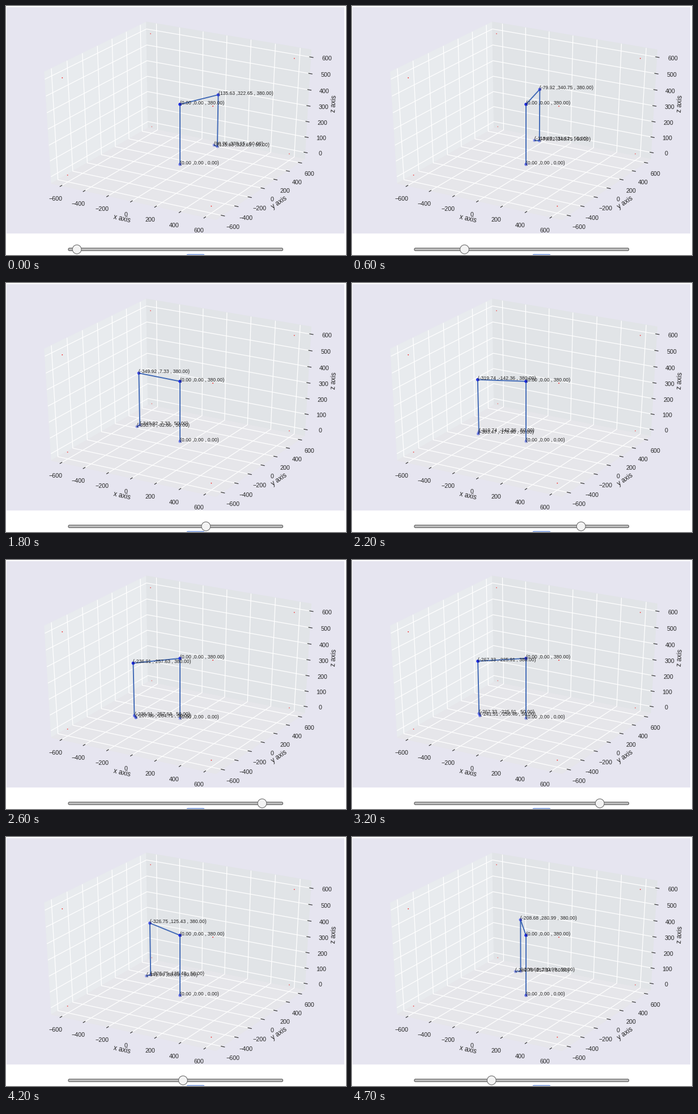
A matplotlib script for the animation above (4800 ms loop, 600 by 440 pixels).

```python
import numpy as np
import matplotlib.pyplot as plt
from matplotlib.animation import FuncAnimation
from matplotlib.patches import Circle, FancyBboxPatch, Polygon, Rectangle

plt.rcParams["font.family"] = "Liberation Sans"

W, H, DPI = 600, 440, 100
FRAMES, INTERVAL = 48, 100
PT = 72 / DPI           # points per pixel
INK = "#262626"
BLUE = "#3f68b5"

# Plot area on the page, in pixels
LEFT, TOP, PW, PH = 1, 2, 596, 400
CX = LEFT + PW * 0.95 / 1.85
CY = TOP + PH * 0.90 / 1.85
SX, SY = PW / 1.85, PH / 1.85

# Camera and data ranges
ELEV, AZIM, DIST = np.radians(30), np.radians(-60), 10
CENTER = np.array([0, 0, 300])
SPAN = np.array([1320, 1320, 660])
EDGE = 0.5 * 25 / 24    # half the box, in units of the span
LO, HI = CENTER - EDGE * SPAN, CENTER + EDGE * SPAN
TICK_PAD, LABEL_PAD = 0.065, 0.1083


def project(p):
    """Return pixel x, pixel y and depth towards the viewer."""
    u, v, w = ((np.asarray(p, float) - CENTER) / SPAN).T
    side = -np.sin(AZIM) * u + np.cos(AZIM) * v
    near = np.cos(AZIM) * u + np.sin(AZIM) * v
    depth = np.cos(ELEV) * near + np.sin(ELEV) * w
    up = np.cos(ELEV) * w - np.sin(ELEV) * near
    k = 1 / (1 - depth / DIST)
    return CX + SX * side * k, CY - SY * up * k, depth


def line3d(points, color, width, z):
    x, y, _ = project(points)
    ax.plot(x, y, color=color, lw=width * PT, zorder=z, solid_capstyle="butt")


def pane(points, color):
    x, y, _ = project(points)
    ax.add_patch(Polygon(np.column_stack([x, y]), fc=color, ec=color,
                         lw=PT, zorder=1))


def draw_panes():
    (x0, y0, z0), (x1, y1, z1) = LO, HI
    pane([(x0, y0, z0), (x0, y1, z0), (x0, y1, z1), (x0, y0, z1)], "#e8ebee")
    pane([(x0, y1, z0), (x1, y1, z0), (x1, y1, z1), (x0, y1, z1)], "#e1e4e7")
    pane([(x0, y0, z0), (x1, y0, z0), (x1, y1, z0), (x0, y1, z0)], "#e6e6ea")


def draw_axis(i, ticks, edge, out, tick_dir, grid, name):
    """edge: fixed corner, out: outward signs, grid: corners of the grid bend."""
    edge, out = np.array(edge, float), np.array(out, float)
    for t in ticks:
        bend = np.array(grid, float)
        bend[:, i] = t
        line3d(bend, "white", 1.25, 2)

        pos = edge.copy()
        pos[i] = t
        step = np.zeros(3)
        step[tick_dir] = out[tick_dir] * SPAN[tick_dir] / 12
        line3d([pos - 0.1 * step, pos + 0.2 * step], INK, 1.1, 3)

        x, y, _ = project(pos + out * TICK_PAD * SPAN)
        ax.text(x, y, str(t).replace("-", "\u2212"), size=10.8 * PT,
                color=INK, ha="center", va="top", zorder=3)

    ends = np.array([edge, edge])
    ends[:, i] = LO[i], HI[i]
    ex, ey, _ = project(ends)
    angle = np.degrees(np.arctan2(ey[0] - ey[1], ex[1] - ex[0]))
    mid = edge.copy()
    mid[i] = CENTER[i]
    x, y, _ = project(mid + out * LABEL_PAD * SPAN)
    ax.text(x, y, name, size=11.9 * PT, color=INK, ha="center", va="center",
            rotation=(angle + 90) % 180 - 90, rotation_mode="anchor", zorder=3)


def draw_axes():
    (x0, y0, z0), (x1, y1, z1) = LO, HI
    wide, tall = range(-600, 601, 200), range(0, 601, 100)
    draw_axis(0, wide, (0, y0, z0), (0, -1, -1), 1,
              [(0, y0, z0), (0, y1, z0), (0, y1, z1)], "x axis")
    draw_axis(1, wide, (x1, 0, z0), (1, 0, -1), 0,
              [(x1, 0, z0), (x0, 0, z0), (x0, 0, z1)], "y axis")
    draw_axis(2, tall, (x1, y1, 0), (1, 1, 0), 0,
              [(x0, y0, 0), (x0, y1, 0), (x1, y1, 0)], "z axis")


def shade(depth):
    """Fade points with their distance from the viewer."""
    return 0.3 + 0.7 * (depth - depth.min()) / np.ptp(depth)


def draw_corners():
    pts = [(x, y, z) for x in (-600, 600) for y in (-600, 600) for z in (0, 600)]
    x, y, depth = project(pts)
    rgba = np.tile([0.95, 0.12, 0.12, 1], (8, 1))
    rgba[:, 3] = np.clip(shade(depth) + 0.15, 0, 1)
    ax.scatter(x, y, s=(1.8 * PT) ** 2, c=rgba, lw=0, zorder=3)


def draw_controls():
    ax.add_patch(FancyBboxPatch((111, 428.8), 376.5, 2.6,
                                boxstyle="round,pad=1,rounding_size=2",
                                fc="#bdbdbd", ec="#5c5c5c", lw=1.1 * PT, zorder=3))
    ax.add_patch(FancyBboxPatch((318.5, 439), 32, 14,
                                boxstyle="round,pad=0,rounding_size=3",
                                fc="#dce5f8", ec="#6a90dc", lw=1.3 * PT, zorder=3))


def slider_value(i):
    return round(min(3.6 + 3.45 * i, 199.6 - 3.45 * i, 100))


def arm(value):
    a = np.radians(60 + 1.8 * value)
    x, y = 350 * np.cos(a), 350 * np.sin(a)
    tip = x - 40 * np.sin(a), y + 40 * np.cos(a)
    return np.array([(0, 0, 0), (0, 0, 380), (x, y, 380), (x, y, 50), (*tip, 50)])


fig = plt.figure(figsize=(W / DPI, H / DPI), dpi=DPI, facecolor="white")
ax = fig.add_axes([0, 0, 1, 1])
ax.set(xlim=(0, W), ylim=(H, 0))
ax.axis("off")

ax.add_patch(Rectangle((LEFT, TOP), PW, PH, fc="#e6e5f0", lw=0, zorder=0))
draw_panes()
draw_axes()
draw_corners()
draw_controls()

links, = ax.plot([], [], color=BLUE, lw=1.9 * PT, zorder=4)
joints = ax.scatter(np.zeros(5), np.zeros(5), s=(5.6 * PT) ** 2, lw=0, zorder=5)
notes = [ax.text(0, 0, "", size=8.64 * PT, color=INK, zorder=6) for _ in range(5)]
thumb = ax.add_patch(Circle((0, 430), 7.9, fc="#f3f3f3", ec="#6e6e6e",
                            lw=1.1 * PT, zorder=7))


def update(i):
    value = slider_value(i)
    pts = arm(value)
    x, y, depth = project(pts)
    links.set_data(x, y)
    joints.set_offsets(np.column_stack([x, y]))
    rgba = np.tile([0.1, 0.16, 0.88, 1], (5, 1))
    rgba[:, 3] = shade(depth)
    joints.set_facecolors(rgba)
    for note, p, px, py in zip(notes, pts, x, y):
        note.set_position((px, py))
        note.set_text("({:.2f} ,{:.2f} , {:.2f})".format(*p))
    thumb.center = (110.4 + 3.673 * value, 430)
    return links, joints, thumb, *notes


anim = FuncAnimation(fig, update, frames=FRAMES, interval=INTERVAL,
                     repeat=True, repeat_delay=0)
plt.show()
```
